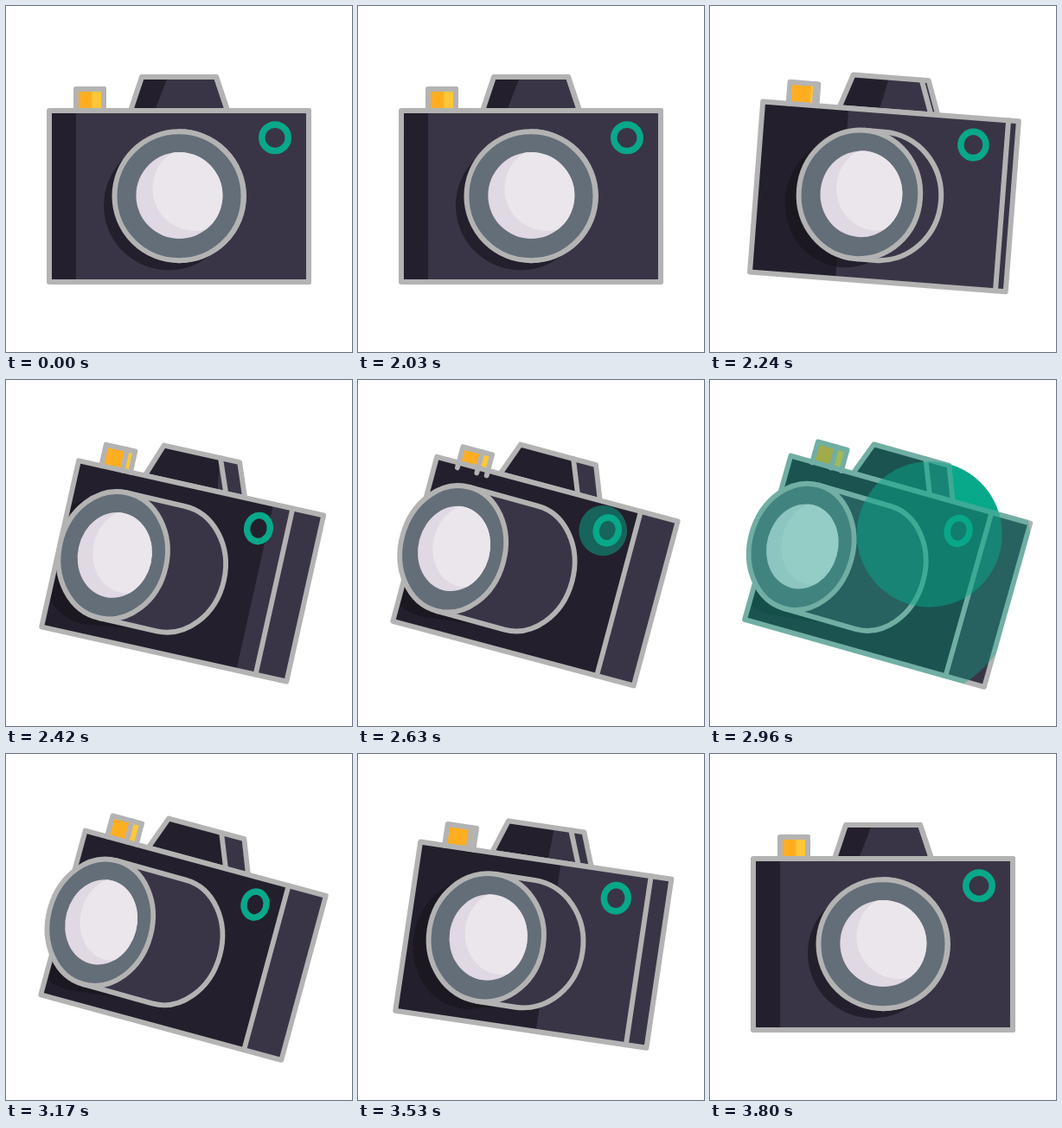
An HTML page with a canvas that plays this animation: 400 px wide and 400 px high, repeating every 3830 ms.

```html
<!DOCTYPE html>
<html lang="en">
<head>
<meta charset="utf-8">
<title>Camera</title>
<style>
  html, body { margin: 0; width: 100%; height: 100%; overflow: hidden; background: #fff; }
  canvas { display: block; width: 100vmin; height: 100vmin; }
</style>
</head>
<body>
<canvas id="stage" width="400" height="400"></canvas>
<script>
const ctx = document.getElementById('stage').getContext('2d');
const LOOP = 3830, START = 2015, PEAK = 2915;
const BODY = '#3a3546', DARK = '#241f2c', GRAY = '#b3b3b3', GREEN = '#08a88a', STEEL = '#646e78';
const TURN = 15.74 * Math.PI / 180;

const mix = (a, b, p) => a + (b - a) * p;
const clamp = v => Math.max(0, Math.min(1, v));
const smooth = v => { v = clamp(v); return v * v * (3 - 2 * v); };

// Cubic bezier ease (.46, 0, .02, 1)
function ease(x) {
  let lo = 0, hi = 1;
  for (let i = 0; i < 30; i++) {
    const s = (lo + hi) / 2, r = 1 - s;
    if (3 * r * r * s * .46 + 3 * r * s * s * .02 + s * s * s < x) lo = s; else hi = s;
  }
  return lo * lo * (3 - 2 * lo);
}

function turnAt(t) {
  return ease(clamp(1 - Math.abs(t - PEAK) / (PEAK - START)));
}

function poly(points, closed = true) {
  const path = new Path2D();
  points.forEach(([x, y], i) => i ? path.lineTo(x, y) : path.moveTo(x, y));
  if (closed) path.closePath();
  return path;
}

function oval(x, y, rx, ry) {
  const path = new Path2D();
  path.ellipse(x, y, rx, ry, 0, 0, Math.PI * 2);
  return path;
}

function box(x0, y0, x1, y1) {
  return poly([[x0, y0], [x1, y0], [x1, y1], [x0, y1]]);
}

function fill(path, color) {
  ctx.fillStyle = color;
  ctx.fill(path);
}

function line(path, color = GRAY, width = 6) {
  ctx.strokeStyle = color;
  ctx.lineWidth = width;
  ctx.stroke(path);
}

function inside(path, draw) {
  ctx.save();
  ctx.clip(path);
  draw();
  ctx.restore();
}

function finder(p) {
  const bl = mix(144, 128, p), tl = mix(157, 142.6, p);
  const tm = mix(243, 207.6, p), bm = mix(256, 224, p);
  const tr = mix(243, 237, p), br = mix(256, 253, p);
  const whole = poly([[bl, 121], [tl, 82], [tr, 82], [br, 121]]);
  const front = poly([[bl, 121], [tl, 82], [tm, 82], [bm, 121]]);
  const q = Math.pow(p, 1.15);
  fill(whole, BODY);
  inside(front, () => fill(poly([[100, 121], [100, 82], [mix(187, 222, q), 82], [mix(172, 234, q), 121]]), DARK));
  line(whole);
  line(poly([[tm, 82], [bm, 121]], false));
}

function shutterEdges(p) {
  return [mix(81, 77, p), 113 - 12.3 * Math.pow(p, 1.2), mix(113, 113.6, p)];
}

function shutterFill(p, drop) {
  const [l, m, r] = shutterEdges(p), top = 96 + drop;
  fill(box(l, top, r, 121), '#ffc738');
  fill(box(l, top, Math.min(m, mix(99.5, 119.5, p)), 121), '#ffae22');
}

function shutterLine(p, drop) {
  const [l, m, r] = shutterEdges(p), top = 96 + drop, end = 121 + drop;
  line(poly([[l, end], [l, top], [r, top], [r, end]], false));
  line(poly([[m, top], [m, end]], false));
}

function body(p) {
  const rect = box(50, 121, 350, 319);
  const edge = 350 - 48.5 * Math.pow(p, 1.1);
  const dark = box(50, 121, Math.min(edge, 81 + 262 * Math.pow(p, 1.04)), 319);
  const x = 188 - 115 * p, base = 200 - 18.5 * p;
  const shadow = oval(x, 230.5, 75 - 13 * p, 75);
  shadow.addPath(poly([[x, 220], [base, 220], [base, 294], [x, 305.5]]));

  fill(rect, BODY);
  inside(rect, () => {
    fill(shadow, DARK);
    fill(dark, DARK);
    inside(dark, () => fill(shadow, 'rgba(0,0,0,.22)'));
  });
  line(rect);
  line(poly([[edge, 121], [edge, 319]], false));
}

function lens(p) {
  const swing = p * (1 - p);
  const x = 200 - 108 * p + 6 * swing, base = 200 - 18.5 * p;
  const baseY = 219.7 + .7 * p, k = 1 - .165 * p;
  const barrel = new Path2D();
  barrel.moveTo(x, 145.2);
  barrel.lineTo(base, baseY - 74.5);
  barrel.ellipse(base, baseY, 75 - 12 * p, 74.5, 0, -Math.PI / 2, Math.PI / 2);
  barrel.lineTo(x, 294.2);
  fill(barrel, BODY);
  line(barrel);

  const rim = oval(x, 219.7, 74.5 * k, 74.5);
  fill(rim, STEEL);
  line(rim);

  const gx = x + .4 + .6 * p + 7 * swing, gk = 1 - .145 * p;
  const glass = oval(gx, 219, 50 * gk, 50);
  fill(glass, '#e0d8e2');
  inside(glass, () => fill(oval(gx + 18 * gk, 211, 49 * gk, 49), '#ebe6ec'));
}

function lamp(p) {
  const k = 1 - .12 * p;
  line(oval(311 - 42 * p, 152.3, 15.2 * k, 15.2), GREEN, 7.6);
}

// Three rings swell from the lamp, one after another
function ripples(t) {
  const list = [];
  for (let i = 0; i < 3; i++) {
    const age = t - 2570 - i * 120;
    if (age < 0 || age > 340) continue;
    const k = clamp(age / 240), u = k * k;
    list.push({
      path: oval(287 - 101 * Math.pow(u, 1.2), 174 + 27 * u * u, 17 + 169 * u, 18.5 + 166 * u),
      alpha: Math.max(.5, 1 - 2 * k) * (1 - clamp((age - 250) / 90)),
      solid: age <= 255
    });
  }
  return list;
}

function draw(t) {
  const p = turnAt(t);
  const drop = 6 * smooth((t - 2480) / 90) * (1 - smooth((t - 2830) / 170));
  ctx.clearRect(0, 0, 400, 400);
  ctx.lineJoin = 'round';
  ctx.lineCap = 'round';

  ctx.save();
  ctx.translate(200 + 5.2 * p, 220 + 1.2 * p);
  ctx.rotate(TURN * p);
  ctx.scale(1 - .041 * p, 1 - .007 * p);
  ctx.translate(-200, -220);
  shutterFill(p, drop);
  finder(p);
  body(p);
  shutterLine(p, drop);
  lamp(p);
  lens(p);
  ctx.restore();

  const rings = ripples(t);
  ctx.save();
  // Tint the camera, then put solid green behind it
  ctx.globalCompositeOperation = 'source-atop';
  for (const r of rings) {
    ctx.globalAlpha = r.alpha;
    fill(r.path, GREEN);
  }
  ctx.globalAlpha = 1;
  ctx.globalCompositeOperation = 'destination-over';
  for (const r of rings) if (r.solid) fill(r.path, GREEN);
  ctx.restore();
}

const began = performance.now();
function tick() {
  draw((performance.now() - began) % LOOP);
  requestAnimationFrame(tick);
}
tick();
</script>
</body>
</html>
```
